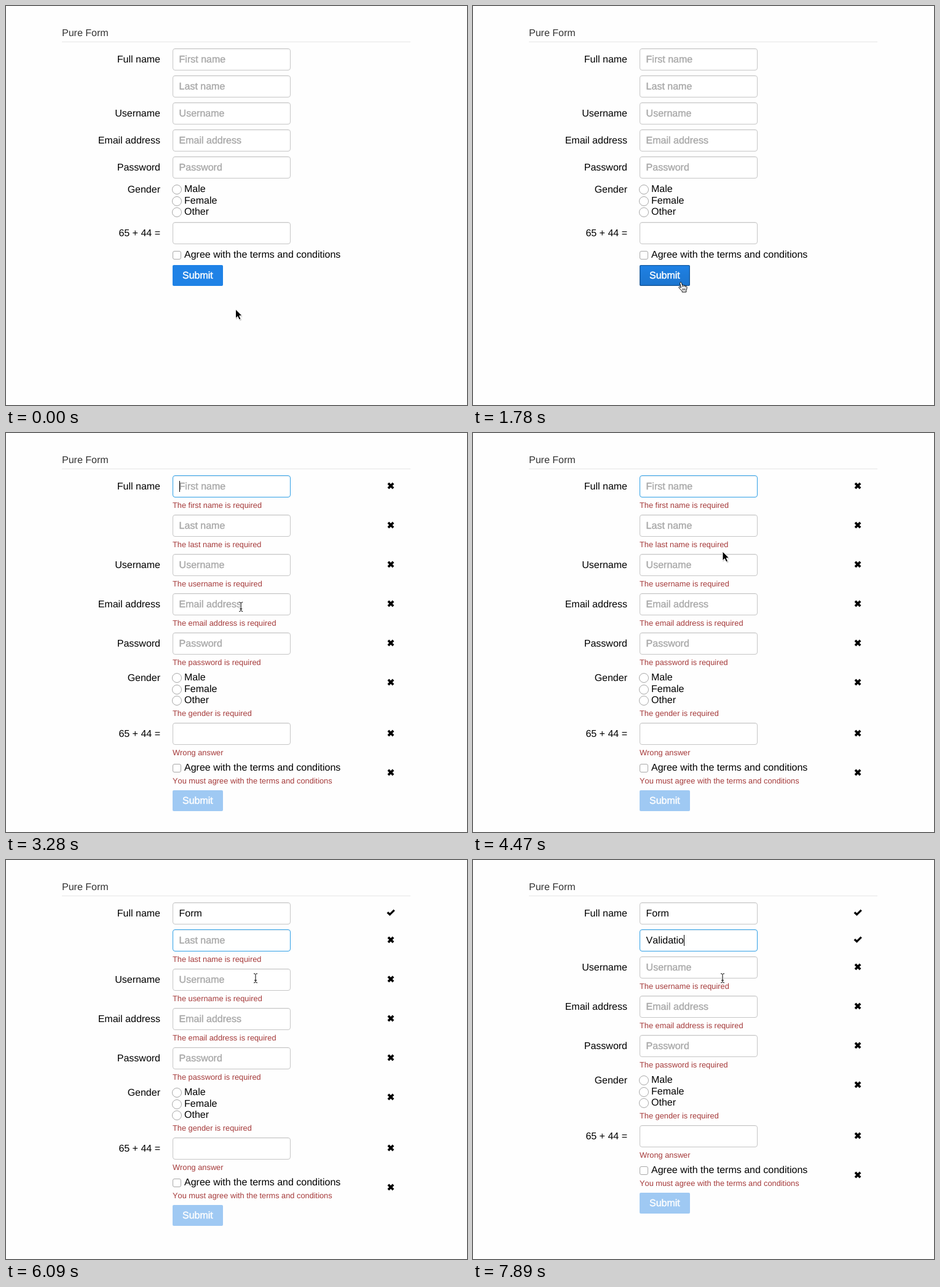
An HTML page that plays this animation: 750x650 px, repeating every 8 s.

```html
<!DOCTYPE html>
<html lang="en">
<head>
<meta charset="utf-8">
<title>Form validation</title>
<style>
  html, body { margin: 0; width: 100%; height: 100%; overflow: hidden; background: #fefefe; }
  svg { display: block; width: 750px; height: 650px; }
  text {
    font: 16px "Liberation Sans", Arial, sans-serif;
    font-kerning: none;
    text-rendering: geometricPrecision;
    white-space: pre;
  }
  .label { text-anchor: end; }
  .legend { fill: #333; }
  .hint { fill: #a9a9a9; stroke: #a9a9a9; stroke-width: .4px; }
  .error { fill: #a53a3a; font-size: 12.8px; }
  .caption { fill: #fff; stroke: #fff; stroke-width: .45px; }
  .field { fill: #fff; stroke: #c6c6c6; }
  .field.focus { stroke: #2f9fe6; }
  .shade { stroke: #000; stroke-opacity: .06; }
  .choice { fill: #fff; stroke: #a8a8a8; }
  .icon { fill: none; stroke: #000; }
</style>
</head>
<body>
<svg viewBox="0 0 750 650">
  <defs>
    <linearGradient id="hover" x2="0" y2="1">
      <stop offset="0" stop-opacity="0"/>
      <stop offset=".4" stop-opacity=".05"/>
      <stop offset="1" stop-opacity=".1"/>
    </linearGradient>
    <path id="cross" class="icon" stroke-width="3.7" d="M-4.1-4.1 4.1 4.1M4.1-4.1-4.1 4.1"/>
    <path id="check" class="icon" stroke-width="3.3" d="M-5.3-.8-1.6 2.8 5.7-4.4"/>
    <g id="arrow">
      <path d="M1 2V17.5L5 14 7.5 19.5 10.5 18 8 13H12Z" opacity=".18"/>
      <path d="M.5.5V15.4L3.9 12.2 6.3 17.6 9 16.4 6.7 11.2H11.3Z" stroke="#fff"/>
    </g>
    <g id="text">
      <path id="beam" d="M-2.5-7.5Q0-7.5.5-6 1-7.5 3.5-7.5M.5-6V6M-2.5 7.5Q0 7.5.5 6 1 7.5 3.5 7.5M-1.5 3.5H2.5"
        fill="none" stroke="#fff" stroke-width="2.4" stroke-opacity=".8"/>
      <use href="#beam" style="stroke:#000"/>
      <path d="M-2.5-7.5Q0-7.5.5-6 1-7.5 3.5-7.5M.5-6V6M-2.5 7.5Q0 7.5.5 6 1 7.5 3.5 7.5M-1.5 3.5H2.5"
        fill="none" stroke="#000"/>
    </g>
    <g id="hand" stroke="#000" stroke-linejoin="round">
      <path fill="#fff" d="M-1.4 1.5C-1.6-.2 1-.5 1.5 1.4L2.6 5.2C3.4 4.2 4.8 4.6 5 5.6 5.8 4.9 7.2 5.3 7.5 6.4
        8.5 5.9 9.8 6.5 9.9 7.8 10.2 10.5 9.5 11.8 8.8 13.4V16H2.2V14.5C.5 12.8-1.2 11-3 8.8-3.6 7.6-2 6.7-1 7.8L.3 9Z"/>
      <path fill="none" d="M3 10V13.4M5 10V13.4M7 10V13.4M2.6 5.2V8M5 5.6V8M7.5 6.4V8.4" stroke-width=".8"/>
    </g>
  </defs>
  <g id="scene"></g>
</svg>
<script>
const LOOP = 8000;
const PRESS = 1780, SUBMIT = 1930, TAB = 5650;
const CARET_TOGGLES = [1930, 2380, 2830, 3420, 3870, 4470, 4760, 6090, 6390];
const TYPING = [
  { text: "Form", times: [4760, 4910, 5050, 5200] },
  { text: "Validatio", times: [6390, 6690, 6840, 6990, 7140, 7290, 7590, 7740, 7890] },
];
const MOVES = [
  { from: [373, 493.5], to: [338, 450], times: [900, 1050, 1190, 1340, 1480] },
  { from: [338, 450], to: [405.5, 192.5], times: [2980, 3130, 3280, 3420, 3570] },
];

// y is the row's top before any error message pushes it down
const ROWS = [
  { y: 69, label: "Full name", hint: "First name", error: "The first name is required" },
  { y: 113, hint: "Last name", error: "The last name is required" },
  { y: 157, label: "Username", hint: "Username", error: "The username is required" },
  { y: 201, label: "Email address", hint: "Email address", error: "The email address is required" },
  { y: 245, label: "Password", hint: "Password", error: "The password is required" },
  { y: 289, label: "Gender", options: ["Male", "Female", "Other"], error: "The gender is required", errorY: 72 },
  { y: 352, label: "65 + 44 =", hint: "", error: "Wrong answer" },
  { y: 396, agree: "Agree with the terms and conditions", error: "You must agree with the terms and conditions", errorY: 35 },
];
const ERROR_HEIGHT = 20, BUTTON_Y = 422, TEXT_X = 281.6;

const scene = document.getElementById("scene");
const measure = document.createElement("canvas").getContext("2d");
measure.font = '16px "Liberation Sans", Arial, sans-serif';
measure.fontKerning = "none";

const passed = (times, t) => times.filter(time => time <= t).length;
const smooth = k => k * k * (3 - 2 * k);
const label = (x, y, content, type = "") => `<text x="${x}" y="${y}" class="${type}">${content}</text>`;
const place = (id, x, y) => `<use href="#${id}" x="${x}" y="${y}"/>`;
const within = (value, low, high) => value >= low && value <= high;

function pointer(t) {
  let point = MOVES[0].from;
  for (const { from, to, times } of MOVES) {
    const count = passed(times, t);
    if (!count) break;
    const k = smooth(count / times.length);
    point = from.map((start, i) => start + (to[i] - start) * k);
  }
  return point;
}

function inputField(y, hint, typed, focused, caretOn) {
  const caretX = Math.round(TEXT_X + measure.measureText(typed).width);
  return `<rect x="271.5" y="${y + .5}" width="191" height="35" rx="3.5" class="field ${focused ? "focus" : ""}"/>`
    + `<path d="M274 ${y + 1.5}H460" class="shade"/>`
    + (typed ? label(TEXT_X, y + 23, typed) : label(TEXT_X, y + 23, hint, "hint"))
    + (focused && caretOn ? `<rect x="${caretX}" y="${y + 9}" width="1" height="18"/>` : "");
}

function radioList(y, options) {
  return options.map((name, i) => {
    const dy = Math.round(i * 18.5);
    return `<circle cx="278" cy="${y + 10 + dy}" r="7.5" class="choice"/>` + label(290, y + 14 + dy, name);
  }).join("");
}

function checkbox(y, content) {
  return `<rect x="271.5" y="${y + 3.5}" width="13" height="13" rx="2.5" class="choice"/>` + label(290, y + 14, content);
}

function button(y, disabled, hovered, pressed) {
  const box = `x="271" y="${y}" width="82" height="34" rx="2"`;
  return `<g opacity="${disabled ? .42 : 1}"><rect ${box} fill="#1f82e6"/>`
    + (hovered ? `<rect ${box} fill="url(#hover)"/>` : "")
    + (pressed ? `<rect x="271.5" y="${y + .5}" width="81" height="33" rx="1.5" fill="none" stroke="#000" stroke-opacity=".3"/>`
      + `<rect x="272.5" y="${y + 1.5}" width="79" height="31" fill="none" stroke="#000" stroke-opacity=".08"/>` : "")
    + label(287, y + 22, "Submit", "caption") + "</g>";
}

function draw(t) {
  const submitted = t >= SUBMIT;
  const focus = submitted ? (t >= TAB ? 1 : 0) : -1;
  const caretOn = passed(CARET_TOGGLES, t) % 2 === 1;
  const [px, py] = pointer(t);
  let cursor = "arrow", shift = 0;
  let out = label(91, 49, "Pure Form", "legend") + '<path d="M91 58.5H658" stroke="#e5e5e5"/>';

  ROWS.forEach((row, i) => {
    const y = row.y + shift;
    const entry = TYPING[i];
    const typed = entry ? entry.text.slice(0, passed(entry.times, t)) : "";
    const isField = row.hint !== undefined;
    if (row.label) out += label(251, y + (isField ? 23 : 15), row.label, "label");
    if (isField) {
      out += inputField(y, row.hint, typed, i === focus, caretOn);
      if (within(px, 271, 463) && within(py, y, y + 36)) cursor = "text";
    } else {
      out += row.options ? radioList(y, row.options) : checkbox(y, row.agree);
    }
    if (!submitted) return;
    out += place(typed ? "check" : "cross", 626, y + 17);
    if (typed) return;
    const base = y + (row.errorY || 53);
    out += label(271, base, row.error, "error");
    if (within(px, 271, 420) && within(py, base - 14, base + 4)) cursor = "text";
    shift += ERROR_HEIGHT;
  });

  const top = BUTTON_Y + shift;
  const hovered = !submitted && within(px, 271, 353) && within(py, top, top + 34);
  if (hovered) cursor = "hand";
  out += button(top, submitted, hovered, hovered && t >= PRESS);
  return out + place(cursor, px, py);
}

let shown = "";
const start = performance.now();
function tick() {
  const markup = draw((performance.now() - start) % LOOP);
  if (markup !== shown) scene.innerHTML = shown = markup;
  requestAnimationFrame(tick);
}
tick();
</script>
</body>
</html>
```
